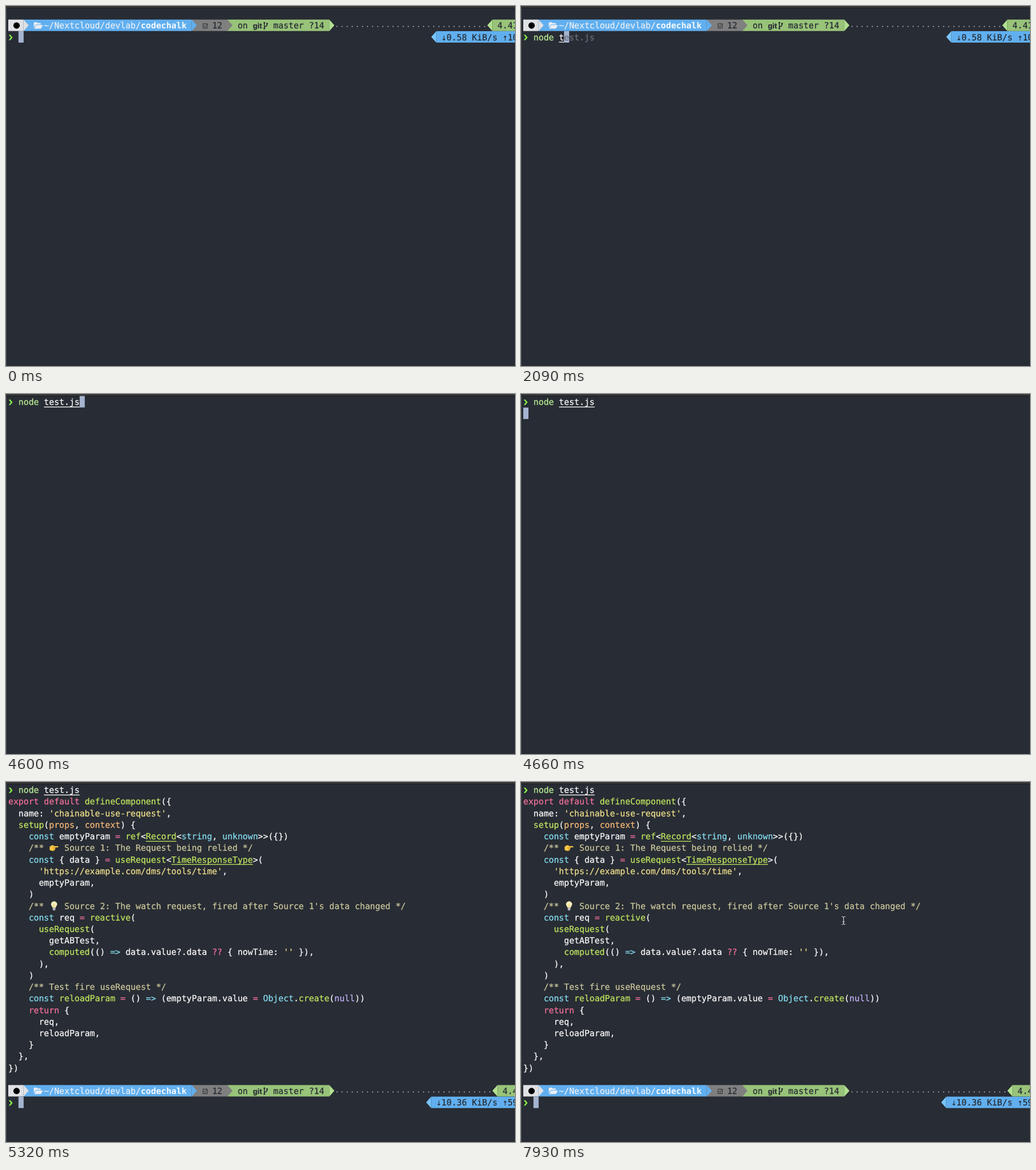
An HTML page that plays this animation: 890x629 px, repeating every 7990 ms.

```html
<!DOCTYPE html>
<html lang="en">
<head>
<meta charset="utf-8">
<title>Terminal</title>
<style>
  html, body { margin: 0; width: 100%; height: 100%; overflow: hidden; background: #282c34; }
  svg { display: block; }
  text {
    font: 14.8px "DejaVu Sans Mono", monospace;
    font-variant-ligatures: none;
    text-rendering: geometricPrecision;
    white-space: pre;
    fill: currentColor;
    stroke: currentColor;
    stroke-width: .25;
  }
  .line    { fill: currentColor; }
  .plain   { color: #fbfbfb; }
  .keyword { color: #f4719c; }
  .func, .type { color: #bfe65f; }
  .word    { color: #84dcf0; }
  .string  { color: #f0e08c; }
  .comment { color: #cbc79c; }
  .arg     { color: #f5b878; }
  .literal { color: #c3b5fb; }
  .known   { color: #b9eb95; }
  .unknown { color: #f0717b; }
  .ghost   { color: #6b717d; }
  .dark    { color: #262b33; }
  .path    { color: #e9eef4; }
  .bold    { color: #f6faff; font-weight: bold; stroke: none; }
  text.tool { font: bold 13px "Liberation Sans", sans-serif; }
</style>
</head>
<body>
<svg width="890" height="629" viewBox="0 0 890 629">
  <defs>
    <path id="beam" d="M-3.5-7Q0-7 0-4.5Q0-7 3.5-7M0-5V5M-3.5 7Q0 7 0 4.5Q0 7 3.5 7M-2 2H2"/>
  </defs>
  <rect width="890" height="629" fill="#282c34"/>
  <rect width="1" height="629" fill="#454950"/>
  <rect width="890" height="3" fill="#38393b"/>
  <rect y="3" width="890" height="1" fill="#1a1c20"/>
  <rect id="cursor" width="9" height="20" fill="#a5b4d0"/>
  <g id="before"></g>
  <g id="code"></g>
  <g id="after"></g>
  <g id="command"></g>
  <g id="pointer" fill="none">
    <use href="#beam" stroke="#15181c" stroke-width="3"/>
    <use href="#beam" stroke="#e4e6e8" stroke-width="1.2"/>
  </g>
</svg>
<script>
const LOOP = 7990, CELL = 8.91, LINE = 20.23;
const COMMAND = 'node test.js';
const KEYS = [500, 830, 1190, 1370, 1790, 2090, 2210, 2450, 2620, 2980, 3280, 3700];
const ENTER = 4600, RUN = 4660, OUTPUT = 5260, DONE = 5320;

const SOURCE = `export default defineComponent({
  name: 'chainable-use-request',
  setup(props, context) {
    const emptyParam = ref<Record<string, unknown>>({})
    /**    Source 1: The Request being relied */
    const { data } = useRequest<TimeResponseType>(
      'https://example.com/dms/tools/time',
      emptyParam,
    )
    /**    Source 2: The watch request, fired after Source 1's data changed */
    const req = reactive(
      useRequest(
        getABTest,
        computed(() => data.value?.data ?? { nowTime: '' }),
      ),
    )
    /** Test fire useRequest */
    const reloadParam = () => (emptyParam.value = Object.create(null))
    return {
      req,
      reloadParam,
    }
  },
})`;

const SYNTAX = new RegExp([
  /(?<comment>\/\*\*.*)/,
  /(?<string>'[^']*')/,
  /(?<keyword>\b(?:export|default|return)\b|\?\?|=(?!>))/,
  /(?<word>\b(?:const|string|unknown|Object)\b|=>)/,
  /(?<type>\b(?:Record|TimeResponseType)\b)/,
  /(?<func>\b(?:defineComponent|setup|ref|useRequest|reactive|computed|create|reloadParam(?= =))\b)/,
  /(?<arg>\b(?:props|context)\b)/,
  /(?<literal>\bnull\b)/,
  /(?<plain>[^\s'=?\w]+|\w+|.)/
].map(r => r.source).join('|'), 'g');

const $ = id => document.getElementById(id);
const x = col => 4 + CELL * col;
const y = row => 3.5 + LINE * row;
const escape = s => s.replace(/&/g, '&amp;').replace(/</g, '&lt;');

// Each word sits on its own terminal column.
const write = (row, col, text, kind) => [...text.matchAll(/\S+/g)].map(m =>
  `<text class="${kind}" x="${x(col + m.index)}" y="${y(row) + 15.7}">${escape(m[0])}</text>`).join('');

const underline = (row, col, length, kind) =>
  `<rect class="line ${kind}" x="${x(col)}" y="${y(row) + 18.5}" width="${length * CELL}" height="1.3"/>`;

const block = (row, from, to, fill) =>
  `<rect x="${x(from)}" y="${y(row)}" width="${(to - from) * CELL}" height="20" fill="${fill}"/>`;

// Powerline tip one cell wide; dir 1 points right, -1 left.
const tip = (row, col, dir, fill) => {
  const base = dir > 0 ? x(col) : x(col + 1);
  return `<path d="M${base} ${y(row)}l${dir * CELL} 10l${-dir * CELL} 10z" fill="${fill}"/>`;
};

const icon = (row, col, shapes) => `<g transform="translate(${x(col)} ${y(row)})">${shapes}</g>`;

const chevron = row => icon(row, 0, '<path d="M.8 6.2H3.6L7.6 11L3.6 15.8H.8L4.4 11Z" fill="#86f04c"/>');

const FOLDER = '<path d="M0 14V6Q0 4.5 1.5 4.5H5L6.5 6H11Q12.5 6 12.5 7.5V8.5H4.5Q3.5 8.5 3 9.5ZM.8 15.8L4 9.5H16L13 15Q12.6 15.8 11.7 15.8Z" fill="#e9eef4"/>';
const CHECK = '<path d="M2 7.2H9.5V15H2ZM3.6 10.6L5.4 13L8.4 8.4" fill="none" stroke="#262b33"/>';
const BRANCH = '<g fill="none" stroke="#262b33" stroke-width="1.5"><path d="M2.2 6V15M2.2 12.5Q7 12 7 8"/><path d="M2.2 5.5h.01M2.2 15.5h.01M7 7h.01" stroke-width="3.2" stroke-linecap="round"/></g>';
const HAND = '<path d="M1 8.5Q3.5 5.5 7 5.5L9 7.4H15.6Q17 8.4 15.6 9.6H10.8Q11.8 11 10.6 12Q11 13.4 9.6 14.2Q9 16 6.6 15.8Q3 15.8 1 13.8Z" fill="#f8c544"/><path d="M6.5 9.6H10.8M7 12H10.4M7 14.2H9.4" stroke="#c98a25" stroke-width=".8"/>';
const BULB = '<path d="M6 14Q5.8 12.4 4.6 11A5.2 5.2 0 1 1 13 11Q11.8 12.4 11.6 14Z" fill="#f8eeb8"/><path d="M7 8.5L8.8 10L10.6 8.5M8.8 10V14" fill="none" stroke="#e2b552" stroke-width=".8"/><path d="M6.4 14H11.2V17L10 18.6H7.6L6.4 17Z" fill="#b6bac0"/>';

function prompt(row, load, loadCol, net, netCol) {
  const blue = '#61afef', grey = '#7f7f7f', green = '#98c379', pale = '#dfe1e5';
  return block(row, 0, 3, pale) + block(row, 3, 36, blue) + block(row, 36, 43, grey) + block(row, 43, 63, green)
    + tip(row, 3, 1, pale) + tip(row, 36, 1, blue) + tip(row, 43, 1, grey) + tip(row, 63, 1, '#b2e08f')
    + icon(row, 0, '<circle cx="14.5" cy="10.4" r="5.6" fill="#000"/>')
    + icon(row, 5, FOLDER) + write(row, 7, '~/Nextcloud/devlab/', 'path') + write(row, 26, 'codechalk', 'bold')
    + icon(row, 38, CHECK) + write(row, 40, '12', 'dark')
    + write(row, 45, 'on', 'dark') + write(row, 48, 'git', 'dark tool') + icon(row, 50, BRANCH)
    + write(row, 52, 'master ?14', 'dark')
    + `<path d="M${x(64.5)} ${y(row) + 12}H${x(loadCol - .4)}" stroke="#b4b6b8" stroke-width="2" stroke-linecap="round" stroke-dasharray="0 ${CELL}"/>`
    + tip(row, loadCol, -1, '#b2e08f') + block(row, loadCol + 1, 100, green) + write(row, loadCol + 2, load, 'dark')
    + tip(row + 1, netCol, -1, '#76c4fb') + block(row + 1, netCol + 1, 100, blue) + write(row + 1, netCol + 2, net, 'dark');
}

function highlight(line, row) {
  return [...line.matchAll(SYNTAX)].map(({ groups, index }) => {
    const [kind, text] = Object.entries(groups).find(([, value]) => value !== undefined);
    return write(row, index, text, kind) + (kind === 'type' ? underline(row, index, text.length, kind) : '');
  }).join('');
}

function commandLine(row, typed) {
  const name = COMMAND.slice(0, Math.min(typed, 4)), arg = COMMAND.slice(5, Math.max(typed, 5));
  return chevron(row) + write(row, 2, name, typed < 4 ? 'unknown' : 'known')
    + write(row, 7, arg, 'plain') + (arg && underline(row, 7, arg.length, 'plain'))
    + (typed ? write(row, 2 + typed, COMMAND.slice(typed), 'ghost') : '');
}

$('before').innerHTML = prompt(1, '4.41', 94, '⇣0.58 KiB/s ⇡10', 83);
$('after').innerHTML = prompt(26, '4.41', 95, '⇣10.36 KiB/s ⇡59', 82) + chevron(27);
$('code').innerHTML = SOURCE.split('\n').map((line, i) => highlight(line, i + 1)).join('')
  + icon(5, 8, HAND) + icon(10, 8, BULB);

const show = (id, on) => { $(id).style.display = on ? '' : 'none'; };

function cursorCell(t, typed) {
  if (t < ENTER) return [2, 2 + typed];
  if (t < RUN) return [0, 14];
  if (t < OUTPUT) return [1, 0];
  return t < DONE ? [26, 0] : [27, 2];
}

let drawn = '';
function render(t) {
  const typed = KEYS.filter(key => key <= t).length;
  const row = t < ENTER ? 2 : 0;
  const state = row + ':' + typed;
  if (state !== drawn) {
    $('command').innerHTML = commandLine(row, typed);
    drawn = state;
  }
  const [cursorRow, cursorCol] = cursorCell(t, typed);
  $('cursor').setAttribute('x', x(cursorCol));
  $('cursor').setAttribute('y', y(cursorRow));
  show('before', t < ENTER);
  show('code', t >= OUTPUT);
  show('after', t >= DONE);
  show('pointer', t >= 7870);
  $('pointer').setAttribute('transform', t < 7930 ? 'translate(794.5 302)' : 'translate(564 242)');
}

const start = performance.now();
function tick() {
  render((performance.now() - start) % LOOP);
  requestAnimationFrame(tick);
}
tick();
</script>
</body>
</html>
```
